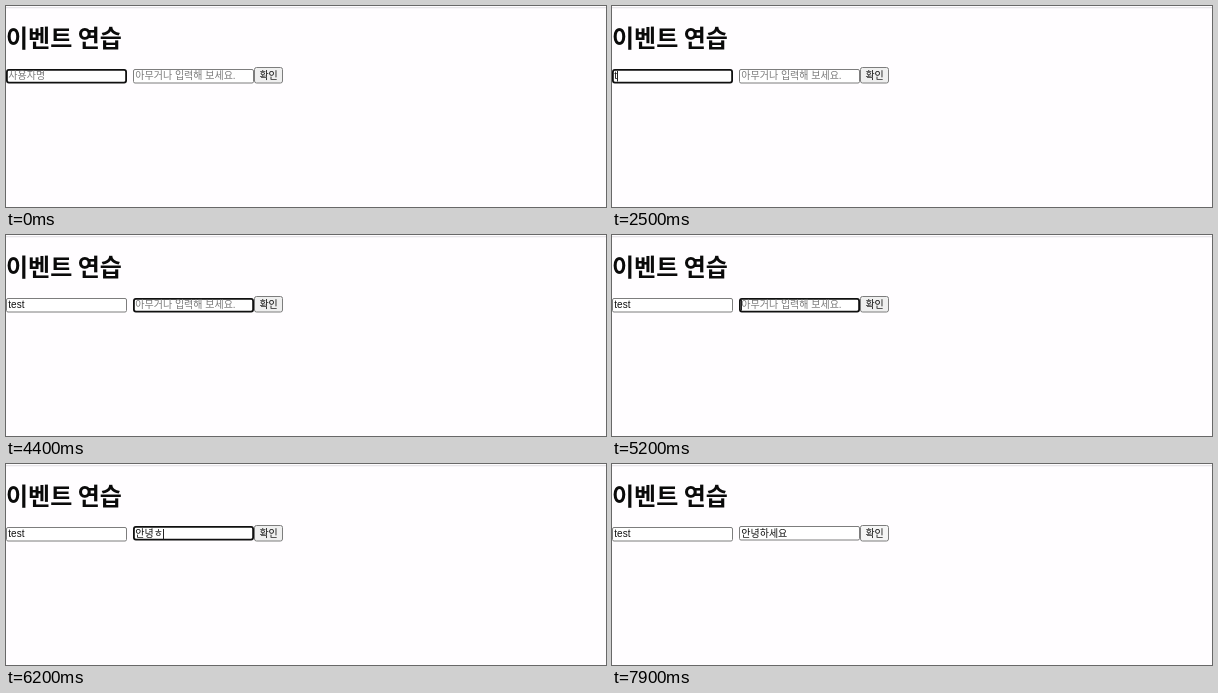
An HTML page with a canvas that plays this animation: 600x201 px, repeating every 8 s.

```html
<!DOCTYPE html>
<html lang="ko">
<head>
<meta charset="utf-8">
<title>이벤트 연습</title>
<style>
html, body { margin: 0; width: 100%; height: 100%; overflow: hidden; background: #fffdff; }
canvas { display: block; width: 600px; height: 201px; }
</style>
</head>
<body>
<canvas id="stage"></canvas>
<script>
const W = 600, H = 201, LOOP = 8000, BLINK = 500;
const FOCUS_SECOND = 3900, BLUR = 7800;
const SMALL = '10px "Liberation Sans", "Noto Sans CJK KR", "Noto Sans CJK", sans-serif';
const BOLD = 'bold 24px "Noto Sans CJK KR", "Noto Sans CJK", sans-serif';

const canvas = document.getElementById('stage');
const ctx = canvas.getContext('2d');
const ratio = window.devicePixelRatio || 1;
canvas.width = W * ratio;
canvas.height = H * ratio;
ctx.scale(ratio, ratio);

// Each entry: time of the keystroke and the field's value after it
const userKeys = [[2500, 't'], [2600, 'te'], [2800, 'tes'], [3000, 'test']];
const wordKeys = [
  [4700, 'd'], [5200, ''], [5400, 'ㅇ'], [5500, '아'], [5600, '안'],
  [5800, '안ㄴ'], [5900, '안녀'], [6000, '안녕'],
  [6200, '안녕ㅎ'], [6300, '안녕하'], [6400, '안녕하ㅅ'],
  [6500, '안녕하세'], [6600, '안녕하세ㅇ'], [6700, '안녕하세요']
];

function typed(keys, t, focusTime) {
  let state = { time: focusTime, value: '' };
  for (const [time, value] of keys) {
    if (t >= time) state = { time, value };
  }
  return state;
}

function text(str, x, y, color, font = SMALL) {
  ctx.font = font;
  ctx.fillStyle = color;
  ctx.fillText(str, x, y);
}

function box(x, y, w, h, radius, line, fill, stroke) {
  const half = line / 2;
  ctx.beginPath();
  ctx.roundRect(x + half, y + half, w - line, h - line, radius);
  ctx.fillStyle = fill;
  ctx.fill();
  ctx.lineWidth = line;
  ctx.strokeStyle = stroke;
  ctx.stroke();
}

function field(x, y, hint, state, focused, t) {
  if (focused) box(x, y, 121, 14.5, 2, 1.8, '#fff', '#101010');
  else box(x, y, 121, 14.5, 1.5, 1, '#fff', '#7d7d7d');

  const left = x + 2.3;
  if (state.value) text(state.value, left, 73.4, '#111');
  else text(hint, left, 73.4, '#7a7a7a');

  const caretOn = Math.floor((t - state.time) / BLINK) % 2 === 0;
  if (focused && caretOn && t >= state.time) {
    ctx.font = SMALL;
    ctx.fillStyle = '#222';
    ctx.fillRect(Math.round(left + ctx.measureText(state.value).width), 65, 1, 10.5);
  }
}

function draw(t) {
  ctx.fillStyle = '#fffdff';
  ctx.fillRect(0, 0, W, H);
  ctx.fillStyle = '#e6e4e8';
  ctx.fillRect(0, 1, W, 1.3);

  text('이벤트 연습', 0, 40.5, '#0a0a0a', BOLD);

  const user = typed(userKeys, t, 100);
  const word = typed(wordKeys, t, FOCUS_SECOND);
  const hangul = word.value > 'z';
  field(0, 63, '사용자명', user, t < FOCUS_SECOND, t);
  field(127, hangul ? 62 : 63, '아무거나 입력해 보세요.', word, t >= FOCUS_SECOND && t < BLUR, t);

  box(248, 61, 29, 16.5, 2, 1, t >= BLUR ? '#f5f5f5' : '#efefef', '#7d7d7d');
  text('확인', 253.4, 73.4, '#111', (t < 5200 ? '500 ' : '') + SMALL);
}

function frame(now) {
  draw(now % LOOP);
  requestAnimationFrame(frame);
}
requestAnimationFrame(frame);
</script>
</body>
</html>
```
